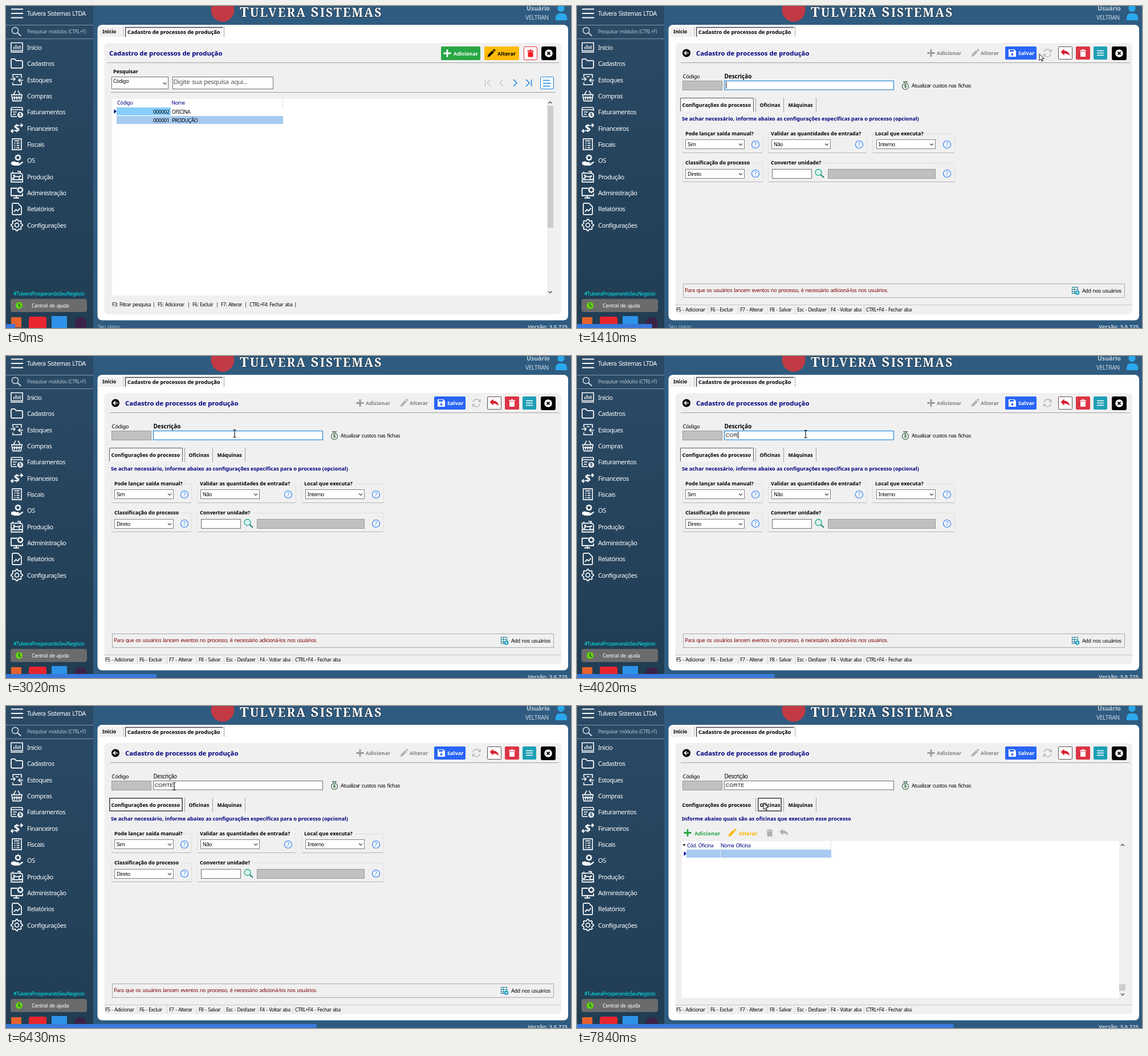
These frames come from a looping animation (991 by 565 pixels, 8000 ms). An HTML page:

```html
<!DOCTYPE html>
<html lang="pt-BR">
<head>
<meta charset="utf-8">
<title>Cadastro de processos</title>
<style>
html, body { margin: 0; width: 100%; height: 100%; overflow: hidden; background: #2f5b80; }
svg { display: block; width: 991px; height: 565px; }
text { font-family: "Noto Sans", "Open Sans", sans-serif; letter-spacing: -.045em; word-spacing: .1em; white-space: pre; }
.b { font-weight: 700; letter-spacing: 0; word-spacing: 0; }
.brand { font-family: "Noto Serif", serif; font-weight: 700; letter-spacing: 2px; word-spacing: 0; }
.typed { font-family: "Liberation Sans", sans-serif; letter-spacing: 0; }
</style>
</head>
<body>
<svg id="stage" viewBox="0 0 991 565"></svg>
<script>
const NAVY = '#000080', BLUE = '#1a86e0', GREY = '#a0a0a0', GREEN = '#28a745', PANEL = '#f0f0f0';

// Drawing helpers: each returns SVG markup.
const text = (x, y, s, size = 9, fill = '#000', attr = '') =>
  `<text x="${x}" y="${y}" font-size="${size}" fill="${fill}" ${attr}>${s}</text>`;
const bold = (x, y, s, size = 9, fill = '#000', attr = '') => text(x, y, s, size, fill, `class="b" ${attr}`);
const box = (x, y, w, h, fill, stroke = '', rx = 0) => stroke
  ? `<rect x="${x + .5}" y="${y + .5}" width="${w - 1}" height="${h - 1}" rx="${rx}" fill="${fill}" stroke="${stroke}"/>`
  : `<rect x="${x}" y="${y}" width="${w}" height="${h}" rx="${rx}" fill="${fill}"/>`;
const line = (d, stroke = '#000', width = 1, fill = 'none') =>
  `<path d="${d}" stroke="${stroke}" stroke-width="${width}" fill="${fill}"/>`;
const shape = (d, fill) => `<path d="${d}" fill="${fill}"/>`;
const disc = (x, y, r, fill, stroke = 'none', width = 1) =>
  `<circle cx="${x}" cy="${y}" r="${r}" fill="${fill}" stroke="${stroke}" stroke-width="${width}"/>`;
const at = (x, y, inner) => `<g transform="translate(${x} ${y})">${inner}</g>`;
const layer = (id, inner) => `<g id="${id}">${inner}</g>`;

const gear = (r, teeth = 8) => {
  let d = '';
  for (let i = 0; i < teeth * 4; i++) {
    const a = (i - .5) / teeth / 4 * 2 * Math.PI, q = i % 4 < 2 ? r : r * .78;
    d += `${i ? 'L' : 'M'}${(q * Math.cos(a)).toFixed(1)} ${(q * Math.sin(a)).toFixed(1)}`;
  }
  return d + 'z';
};
const plus = (x, y, c) => at(x, y, line('M-6.5 0h13M0-6.5v13', c, 2.8));
const pencil = (x, y, c) => at(x, y, shape('M-6.5 6.5l1-4L2-5l3 3-7.5 7.5zM3-6l1-1q1-.7 2 0l1 1q.7 1 0 2l-1 1z', c));
const trash = (x, y, c) => at(x, y, shape('M-5.5-5h3.5l.7-1.5h2.6l.7 1.5h3.5v1.7h-11zM-4.5-2.5h9v8q0 1-1 1h-7q-1 0-1-1z', c));
const undo = (x, y, c) => at(x, y, shape('M-8-2l6-5v3q9 0 9.5 9.5q-3-5-9.5-4.5v3.5z', c));
const closeBtn = x => box(x, 71, 26, 24, '#000', '', 3) + disc(x + 13, 83, 6.8, '#fff')
  + at(x + 13, 83, line('M-2.5-2.5l5 5M2.5-2.5l-5 5', '#000', 1.8));
const chevron = (x, y, c = '#444') => at(x, y, line('M-3-1.5l3 3 3-3', c, 1.1));
const combo = (x, y, s, w = 104, h = 17) =>
  box(x, y, w, h, '#fff', '#808080') + text(x + 4, y + 12, s) + chevron(x + w - 7, y + h / 2 + .5);
const help = (x, y) => disc(x, y, 6.5, '#f6f9ff', '#2f7ee8', 1.2) + text(x - 2.3, y + 3.7, '?', 10, '#2f7ee8');
const group = (x, y, w, title, titleWidth) =>
  box(x, y, w, 34, 'none', '#dedede', 2) + line(`M${x + 1} ${y + 33.5}h${w - 2}`, '#b4b4b4')
  + box(x + 3, y - 3, titleWidth, 8, PANEL) + bold(x + 5, y + 3, title);
const focusFrame = (x, w, fill) => box(x, 161, w, 24, fill, '#484848') + box(x + 1, 162, w - 2, 22, 'none', '#8c8c8c');
const dollar = (x, y, size, c) => text(x, y, '$', size, c, 'class="b" text-anchor="middle"');

const ICONS = [
  line('M-10-8h20v14h-20zM-11 8.5h22M-5 3v-4M-1.5 3v-7M2 3v-5M5.5 3v-6', '#fff', 1.6),
  line('M-10-6q0-2 2-2h4l3 3h9q2 0 2 2v9q0 2-2 2h-16q-2 0-2-2z', '#fff', 1.7),
  line('M-7-4v-5h15v6M8 3v6h-15v-4M-2-5h5M-11-1h8m-3-3l3 3-3 3M11 1h-8m3-3l-3 3 3 3', '#fff', 1.6),
  line('M-10-2h20M-9-1l2 10h14l2-10M-6-2l4-7M6-2l-4-7M-4 1v6M0 1v6M4 1v6M-8 3h16', '#fff', 1.6),
  line('M10-2v-4q0-2-2-2h-16q-2 0-2 2v12q0 2 2 2h8M-10-4h20M-7 0h7M-7 4h5', '#fff', 1.6) + disc(6, 5, 5, '#fff') + dollar(6, 8.5, 9, '#27475f'),
  dollar(0, 6.5, 18, '#fff') + line('M-5 5h-5m3-3l-3 3 3 3M5-5h5m-3-3l3 3-3 3', '#fff', 1.8),
  line('M-8-9.5h16v19h-16zM-4.5-6h9M-4.5-2h2M-.5-2h5M-4.5 2h2M-.5 2h5M-4.5 6h2M-.5 6h5', '#fff', 1.6),
  at(2, -5, line(gear(4.5), '#fff', 2)) + shape('M-10 3q5-3 9 0h4q2 1 0 2.5h-4 5l6-3.5q2 1 0 2.5l-6 4.5h-9l-5-2z', '#fff'),
  line('M-10 9.5h20v-4h-20zM-10-6h15q5 0 5 4v7h-6v-5h-9v3h-5zM-7-6v-3M1-9h5v3M-7-2h4', '#fff', 1.6) + disc(6, -1, 1.5, '#fff'),
  line('M1-8h-11v13h20v-4M-1 5v4M-6 9h10', '#fff', 1.8) + at(6, -5, line(gear(4.5), '#fff', 1.9)),
  line('M-8-8q0-2 2-2h8l6 6v12q0 2-2 2h-12q-2 0-2-2zM-5 5l3.5-4 3 2.5 4-5', '#fff', 1.7),
  line(gear(10), '#fff', 1.7) + disc(0, 0, 3.5, 'none', '#fff', 1.7)
];
const MENU = ['Início', 'Cadastros', 'Estoques', 'Compras', 'Faturamentos', 'Financeiros', 'Fiscais', 'OS',
  'Produção', 'Administração', 'Relatórios', 'Configurações'];

const frame = () => `<defs><linearGradient id="side" x2="0" y2="1">
  <stop stop-color="#2b4a66"/><stop offset="1" stop-color="#203d53"/></linearGradient></defs>`
  + box(0, 0, 991, 565, '#2f5b80') + box(0, 0, 153, 565, 'url(#side)')
  + line('M9 5.5h21M9 13h21M9 20.5h21', '#fff', 1.8)
  + text(37, 17, 'Tulvera Sistemas LTDA', 10.5, '#fff')
  + line('M0 33.5h153M0 57.5h153', '#8296a8')
  + disc(16, 43, 5.5, 'none', '#dfe7ee', 1.4) + line('M20 47l6 5.5', '#dfe7ee', 1.8)
  + text(37, 48, 'Pesquisar módulos (CTRL+F)', 8.4, '#b3c3d1')
  + MENU.map((s, i) => at(19, 72.5 + i * 28.36, ICONS[i]) + text(37, 76.8 + i * 28.36, s, 11.1, '#fff')).join('')
  + text(13, 508, '#TulveraProsperandoSeuNegócio', 8.65, '#00f0f0')
  + box(8, 514, 134, 23, '#6b6b6b', '', 4) + disc(23, 525.5, 6, '#5fd60d')
  + line('M23 521.5v4.5l3 2', '#3c3c3c', 1.5) + text(45, 529, 'Central de ajuda', 9.1, '#fff')
  + box(9, 546, 18, 18, '#e5622f') + box(40, 545, 31, 31, '#e8252f', '', 4)
  + box(80, 544, 27, 27, '#2d93ea') + disc(131, 557, 11, '#3a2346')
  + disc(380, 7, 20.5, '#c23a44')
  + `<text class="brand" x="410" y="19" font-size="21" fill="#fff" stroke="#1d3346" stroke-width="1.5" paint-order="stroke"><tspan font-size="24">T</tspan>ULVERA <tspan font-size="24">S</tspan>ISTEMAS</text>`
  + bold(913, 8, 'Usuário', 10.5, '#bfcfdc') + text(911, 24, 'VELTRAN', 10.4, '#c8d6e2')
  + disc(973.5, 4, 6.2, '#2aa8ec') + shape('M964 25v-5q1-7 7-7h5q7 0 8 7v5z', '#2aa8ec')
  + text(161, 566, 'Seu plano:', 8.9, '#a9bccd') + bold(915, 566, 'Versão: 3.0.725', 9.5, '#bfcfdc')
  + box(160.5, 33, 825.5, 518.5, '#fff', '', 8)
  + box(164, 37, 39, 17, PANEL) + bold(169, 48, 'Início', 8.7) + line('M205.5 36v18M382.5 36v18', GREY)
  + box(209, 37, 171, 17, '#f8f8f8') + line('M209.5 54v-16.5h171', '#404050', 1.4)
  + bold(213, 49, 'Cadastro de processos de produção', 9.25)
  + box(172.5, 65, 801.5, 476, PANEL, '', 7);

const listView = () => {
  const shortcuts = [[186, 'F3: Filtrar pesquisa'], [257, '|'], [266, 'F5: Adicionar'], [318, '|'], [327, 'F6: Excluir'],
    [368, '|'], [377, 'F7: Alterar'], [418, '|'], [427, 'CTRL+F4: Fechar aba |']];
  return bold(181, 87, 'Cadastro de processos de produção', 11.3, NAVY) + line('M177 99.5h793M184 151.5h779', GREY)
    + `<rect id="add" x="763" y="71" width="69" height="24" rx="2"/>` + plus(774, 83, '#fff') + bold(785, 86.5, 'Adicionar', 9, '#fff')
    + box(839, 71, 61, 24, '#ffbb05', '', 2) + pencil(851, 83, '#000') + bold(862, 86.5, 'Alterar', 9.2)
    + box(908, 71, 24, 24, '#fff', '#e0303c', 2) + trash(920, 83, '#f01820') + closeBtn(939)
    + bold(188, 117.5, 'Pesquisar')
    + box(185, 124, 100, 22, '#fff', '#707070') + text(188, 135, 'Código', 8.9) + chevron(278.5, 136)
    + box(292, 124, 177, 22, '#fff', '#707070') + text(293.5, 137, 'Digite sua pesquisa aqui...', 11.45, '#555')
    + line('M840.5 129v12M850 129l-6 6 6 6M872 129l-6 6 6 6', '#bebebe', 1.2)
    + line('M890 129l6 6-6 6M912 129l6 6-6 6M921.5 129v12', BLUE, 1.5)
    + box(937, 124, 24, 22, '#fff', BLUE, 1) + line('M942 130.5h12M942 135.5h14M942 140.5h12', BLUE, 1.5)
    + box(186, 163, 774, 345, '#fff') + line('M485.5 163v15', '#e2e2e2')
    + text(195, 173, 'Código', 8.9, NAVY) + text(290.5, 173, 'Nome', 8.7, NAVY)
    + box(194, 178, 95, 14, '#87cefa') + box(194, 193, 292, 14, '#a6caf0')
    + shape('M189.5 181v8l4.5-4z', NAVY)
    + text(258, 189, '000002', 9) + text(291, 189, 'OFICINA', 8.7) + text(258, 203.5, '000001', 9) + text(291, 203.5, 'PRODUÇÃO', 8.8)
    + box(949, 163, 11, 345, PANEL) + box(950, 175, 10, 214, '#cdcdcd')
    + line('M951.5 171l3-3 3 3M951.5 500.5l3 3 3-3', '#505050', 1.4)
    + shortcuts.map(([x, s]) => text(x, 526.5, s, 8.4)).join('');
};

const settingsPane = () =>
  bold(184, 201, 'Se achar necessário, informe abaixo as configurações específicas para o processo (opcional)', 9.13, NAVY)
  + group(185, 224, 141, 'Pode lançar saída manual?', 122) + combo(190, 234, 'Sim') + help(313, 243)
  + group(335, 224, 174, 'Validar as quantidades de entrada?', 165) + combo(341, 234, 'Não') + help(495, 243)
  + group(518, 224, 145, 'Local que executa?', 92) + combo(525, 234, 'Interno') + help(649, 243)
  + group(185, 275, 141, 'Classificação do processo', 119) + combo(190, 286, 'Direto', 104) + help(313, 294)
  + group(335, 275, 328, 'Converter unidade?', 95) + box(342, 286, 70, 17, '#fff', '#707070')
  + disc(423.5, 292, 5.5, '#d9f3ee', '#19a58c', 1.3) + line('M427.5 296l5.5 5', '#1b7f74', 2)
  + box(440, 286, 189, 17, '#c0c0c0', '#989898') + help(649, 294)
  + box(186, 487, 775, 25, PANEL, '#a8a8a8')
  + text(189, 502, 'Para que os usuários lancem eventos no processo, é necessário adicioná-los nos usuários.', 9.05, '#800000')
  + box(868, 493, 11, 12, '#fff', '#1c7c94') + line('M868 497.5h11M868 501.5h11M872.5 493v12', '#1c7c94')
  + disc(877.5, 503, 3.8, '#159cc0') + line('M875.5 503h4M877.5 501v4', '#fff') + text(886, 503, 'Add nos usuários', 9.05);

const workshopPane = () =>
  bold(184, 201, 'Informe abaixo quais são as oficinas que executam esse processo', 9.13, NAVY)
  + plus(194, 222.5, GREEN) + bold(206, 226.5, 'Adicionar', 9.5, GREEN)
  + pencil(272, 222.5, '#ffb400') + bold(284, 226.5, 'Alterar', 9.2, '#ffb400')
  + trash(338, 222.5, '#b0b0b0') + undo(363, 222.5, '#b0b0b0')
  + box(184, 237, 778, 275, '#fff') + line('M445.5 237v15M251.5 237v15', '#e2e2e2')
  + shape('M185.5 242.5h5l-2.5 3.5z', '#000')
  + text(193, 247.5, 'Cód. Oficina', 8.8, NAVY) + text(252, 247.5, 'Nome Oficina', 8.8, NAVY)
  + box(192, 252, 254, 14, '#a6caf0') + line('M251.5 252v14', '#dfe9f4') + shape('M187.5 255v8l4.5-4z', '#0000b0')
  + box(951, 237, 11, 275, PANEL) + box(951, 488, 11, 12, '#cdcdcd')
  + line('M954 245.5l3-3 3 3M954 504.5l3 3 3-3', '#505050', 1.4);

const formView = () => {
  const shortcuts = [[174, 'F5 - Adicionar'], [234, 'F6 - Excluir'], [286, 'F7 - Alterar'], [338, 'F8 - Salvar'],
    [386, 'Esc - Desfazer'], [445, 'F4 - Voltar aba'], [507, 'CTRL+F4 - Fechar aba']];
  return disc(192, 82.5, 7, '#000') + line('M196 82.5h-7M192 79l-3.5 3.5 3.5 3.5', '#fff', 1.6)
    + bold(209, 87, 'Cadastro de processos de produção', 11.3, NAVY) + line('M182 99.5h788', GREY)
    + plus(621, 82.5, '#9a9a9a') + bold(631, 86, 'Adicionar', 9, '#808080')
    + pencil(698, 82.5, '#b0b0b0') + bold(708, 86, 'Alterar', 9.2, '#808080')
    + box(751, 71, 55, 23, '#2965f6', '', 2) + shape('M757 76h10l3 3v10h-13z', '#fff') + box(759, 77, 7, 3, '#2965f6')
    + disc(763.5, 85, 2, '#2965f6') + bold(774, 86, 'Salvar', 9.2, '#fff')
    + line('M819 81q2-5 6.5-5 4 0 6 4M831.5 84q-2 5-6.5 5-4 0-6-4M832 76v4h-4M818.5 89v-4h4', '#b4b4b4', 1.4)
    + box(844, 71, 25, 23, '#fff', '#5a4a4c', 1) + undo(856.5, 82.5, '#d42030')
    + box(875, 71, 25, 23, '#dc3545', '', 2) + trash(887.5, 82.5, '#fff')
    + box(906, 71, 24, 23, '#1f9fb6', '', 2) + line('M912 78.5h12M912 82.5h12M912 86.5h12', '#fff', 1.5) + closeBtn(938)
    + text(185.5, 127, 'Código', 9.7) + bold(258.5, 127, 'Descrição', 9.9, '#000', 'id="label"')
    + box(185, 131, 70, 17, '#c0c0c0', '#9a9a9a')
    + '<rect id="field" x="258.5" y="131.5" width="297" height="15.5" fill="#fff"/>'
    + text(260.5, 142, '', 9.5, '#222', 'class="typed" id="typed"') + layer('caret', line('M.5 133v12'))
    + disc(576, 141, 5.5, '#eef5ef', '#3c5a44', 1.2) + line('M573 132.5h6l-2 3h-2z', '#3c5a44', 1.2) + dollar(576, 144, 8, '#2f5a3c')
    + text(587, 143, 'Atualizar custos nas fichas', 9.1)
    + layer('settingsTab', box(181, 161, 129, 24, '#f6f6f6') + line('M181.5 185v-23.5h128M309.5 162v23', '#5a5a5a'))
    + layer('settingsFocus', focusFrame(181, 129, 'none')) + layer('workshopTab', focusFrame(317, 42, '#f6f6f6'))
    + line('M313.5 161v25M362.5 161v25M419.5 161v25', GREY)
    + bold(184.5, 177, 'Configurações do processo', 9.05) + bold(320.5, 177, 'Oficinas', 8.8) + bold(370.5, 177, 'Máquinas', 8.8)
    + layer('settings', settingsPane()) + layer('workshops', workshopPane())
    + line('M172 524.5h802', '#c6c6c6')
    + shortcuts.map(([x, s], i) => text(x, 536, s, 8.5) + (i ? line(`M${x - 3.5} 526v14`, '#d4d4d4') : '')).join('');
};

const cursors = () => layer('cursor',
  layer('arrow', line('M0 0v11.5l2.7-2.5 1.8 4 1.8-.8-1.8-3.9h3.7z', '#000', .9, '#fff'))
  + layer('hand', line('M-1.5 8v-7q0-1.5 1.3-1.5t1.3 1.5v4l4.5 1q1.8.5 1.6 2.5l-1 4.5v2h-6l-4-5.5q-1-2 .6-2z', '#000', .9, '#fff'))
  + layer('beam', line('M-2.5-6.5h2l.5.5.5-.5h2M0-6v12M-2.5 6.5h2l.5-.5.5.5h2', '#000', 1.1)));

document.getElementById('stage').innerHTML = frame() + layer('list', listView()) + layer('form', formView())
  + '<rect id="bar" y="558" height="7" fill="#3a79dc"/>' + cursors();

// The picture advances in even steps; all tables below count in steps.
const LOOP = 8000, STEP = 200.98, LAST = 39;
const OPEN = 7, FIRST_KEY = 18, BLUR = 28, SWITCH = 38;
const WORD = 'CORTE';
const PATH = [
  [2, 855, 420, 'arrow'], [3, 848, 260, 'arrow'], [4, 832, 130, 'arrow'], [5, 813, 88, 'hand'], [6, 811, 84, 'hand'],
  [7, 811, 84, 'arrow'], [8, 760, 98, 'arrow'], [10, 480, 136, 'beam'], [12, 399, 136, 'beam'], [15, 401, 136, 'beam'],
  [20, 401, 137, 'beam'], [24, 409, 139, 'beam'], [25, 423, 138, 'beam'], [28, 415, 138, 'beam'], [31, 310, 139, 'beam'],
  [32, 295, 141, 'beam'], [33, 250, 148, 'arrow'], [35, 190, 168, 'arrow'], [36, 240, 172, 'arrow'],
  [37, 305, 171, 'arrow'], [38, 327, 170, 'arrow']
];

const $ = id => document.getElementById(id);
const show = (id, on) => $(id).style.display = on ? '' : 'none';

function moveCursor(step) {
  const i = PATH.findLastIndex(p => p[0] <= step);
  show('cursor', i >= 0);
  if (i < 0) return;
  const [s, x, y, kind] = PATH[i], [s2, x2, y2] = PATH[i + 1] || [s + 1, x, y];
  const f = Math.min(1, (step - s) / (s2 - s));
  $('cursor').setAttribute('transform', `translate(${Math.round(x + (x2 - x) * f)} ${Math.round(y + (y2 - y) * f)})`);
  for (const k of ['arrow', 'hand', 'beam']) show(k, k === kind);
}

function draw(step) {
  const focused = step < BLUR, switched = step >= SWITCH;
  const typed = Math.max(0, Math.min(WORD.length, step - FIRST_KEY + 1));
  const lastKey = typed ? FIRST_KEY + typed - 1 : OPEN;
  show('list', step < OPEN);
  show('form', step >= OPEN);
  $('add').setAttribute('fill', step >= 5 ? '#1f8a39' : GREEN);
  $('bar').setAttribute('width', 16 + 16.52 * step);
  $('typed').textContent = WORD.slice(0, typed);
  $('field').setAttribute('stroke', focused ? '#0078d7' : '#6e6e6e');
  $('label').classList.toggle('b', focused);
  const caretX = 261 + (typed ? Math.round($('typed').getComputedTextLength()) : 0);
  $('caret').setAttribute('transform', `translate(${caretX} 0)`);
  show('caret', focused && (step - lastKey) * STEP % 1060 < 530);
  show('settingsTab', !switched);
  show('settingsFocus', !focused && !switched);
  show('workshopTab', switched);
  show('settings', !switched);
  show('workshops', switched);
  moveCursor(step);
}

const start = performance.now();
let shown = -1;
function tick() {
  const step = Math.min(LAST, Math.floor(((performance.now() - start) % LOOP + 5) / STEP));
  if (step !== shown) draw(shown = step);
  requestAnimationFrame(tick);
}
tick();
</script>
</body>
</html>
```
